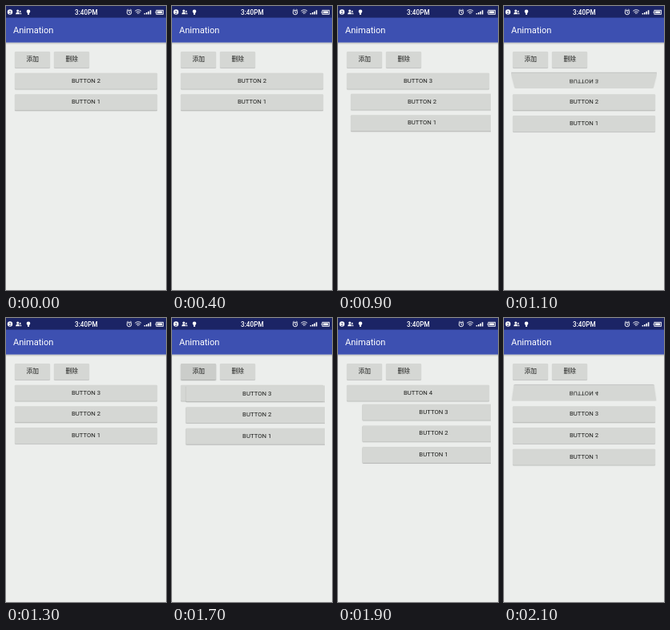
An HTML page that plays this animation: 200x355 px, repeating every 2200 ms.

```html
<!DOCTYPE html>
<html lang="zh">
<head>
<meta charset="utf-8">
<title>Animation</title>
<style>
  html, body { margin: 0; width: 100%; height: 100%; overflow: hidden; background: #eceeec; }
  body { position: relative; font: 400 7.75px Roboto, "Noto Sans CJK SC", "Noto Sans CJK", sans-serif; color: #1c1d1b; }
  #bars { position: absolute; left: 0; top: 0; }
  #list { position: absolute; left: 8.9px; top: 46.2px; width: 182.2px; height: 300px; overflow: hidden; }
  .button {
    position: absolute; left: 2.2px; top: 0; width: 177.8px; height: 20px; line-height: 20px;
    text-align: center; white-space: nowrap; border-radius: 1px;
    background: #d5d7d4; box-shadow: 0 .8px 1px rgba(0, 0, 0, .24);
  }
  .small { top: 11.1px; width: 44.4px; font-weight: 500; }
  .small + .small { left: 51.1px; }
  .pressed { background: #cbcdca; box-shadow: 0 1px 1.5px rgba(0, 0, 0, .3); }
</style>
</head>
<body>
<svg id="bars" width="200" height="52" viewBox="0 0 200 52">
  <defs>
    <linearGradient id="shade" x2="0" y2="1">
      <stop stop-color="#000" stop-opacity=".22"/>
      <stop offset="1" stop-color="#000" stop-opacity="0"/>
    </linearGradient>
  </defs>
  <rect y="45.6" width="200" height="2.6" fill="url(#shade)"/>
  <rect width="200" height="45.6" fill="#3d50b1"/>
  <rect width="200" height="14.6" fill="#1b2465"/>
  <text x="8.9" y="34.2" font-size="11.1" fill="#fff">Animation</text>
  <text x="100.3" y="10.5" font-size="8.2" font-weight="500" fill="#fff" text-anchor="middle">3:40PM</text>
  <g fill="#fff">
    <circle cx="5" cy="7.5" r="3.2"/>
    <circle cx="14.7" cy="6.1" r="1.5"/>
    <path d="M12 10.2q.3-2.6 2.7-2.6t2.7 2.6z"/>
    <circle cx="17.7" cy="6.8" r="1"/>
    <path d="M17.8 10.2v-1.9q1.5.1 1.6 1.9z"/>
    <circle cx="28" cy="6.8" r="2.3"/>
    <path d="M27 8.5h2v2.4h-2z"/>
    <path d="M172.6 9h1.6v1.6h-1.6zM175 8h1.6v2.6H175zM177.4 6.8h1.6v3.8h-1.6zM179.8 5.2h1.6v5.4h-1.6z"/>
    <rect x="189.2" y="6.4" width="6" height="2.8"/>
  </g>
  <text x="5" y="9.6" font-size="5.5" fill="#1b2465" text-anchor="middle">2</text>
  <g fill="none" stroke="#fff" stroke-width=".9">
    <circle cx="154" cy="8" r="2.8"/>
    <path d="M154 6.2v2l1.3.8M150.8 5.6l1.8-1.5M157.2 5.6l-1.8-1.5"/>
    <path d="M161.3 6.3q3.9-3.2 7.8 0M162.6 7.9q2.6-2 5.2 0M163.9 9.4q1.3-.9 2.6 0"/>
    <rect x="188" y="5.3" width="8.4" height="5"/>
    <path d="M187.2 6.8v2"/>
  </g>
</svg>
<div id="list">
  <div class="button small" id="add">添加</div>
  <div class="button small">删除</div>
</div>
<script>
const LOOP = 2200, STEP = 100;
const ROW_TOP = 37.7, PITCH = 26.67, SWING = 100;
const ADDITIONS = [
  { number: 3, start: 616, duration: 316 },
  { number: 4, start: 1667, duration: 292 },
];

const list = document.getElementById('list');
const add = document.getElementById('add');

// Newer buttons sit first in the list, so they are painted below older ones.
const rows = [4, 3, 2, 1].map(number => {
  const node = document.createElement('div');
  node.className = 'button';
  node.textContent = 'BUTTON ' + number;
  list.append(node);
  return { number, node, addition: ADDITIONS.find(a => a.number === number) };
});

function progress(time, start, duration) {
  const p = Math.min(1, Math.max(0, (time - start) / duration));
  return (1 - Math.cos(Math.PI * p)) / 2;
}

function draw(time) {
  const pressed = [600, 1600].some(at => time >= at && time < at + 200);
  add.classList.toggle('pressed', pressed);

  for (const { number, node, addition } of rows) {
    let slot = addition ? 0 : 2 - number;
    let x = 0, flip = '';
    for (const later of ADDITIONS.filter(a => a.number > number)) {
      const e = progress(time, later.start, later.duration);
      slot += e;
      x += SWING * (1 - Math.abs(2 * e - 1));
    }
    if (addition) {
      const { start, duration } = addition;
      const spin = progress(time, start + duration, duration);
      if (spin > 0 && spin < 1) flip = ` perspective(110px) rotateX(${360 * (1 - spin)}deg)`;
      node.style.visibility = time >= start ? 'visible' : 'hidden';
    }
    node.style.transform = `translate(${x}px, ${ROW_TOP + slot * PITCH}px)${flip}`;
  }
}

const origin = performance.now();
function tick() {
  const time = (performance.now() - origin) % LOOP;
  draw(Math.floor(time / STEP) * STEP);
  requestAnimationFrame(tick);
}
tick();
</script>
</body>
</html>
```
